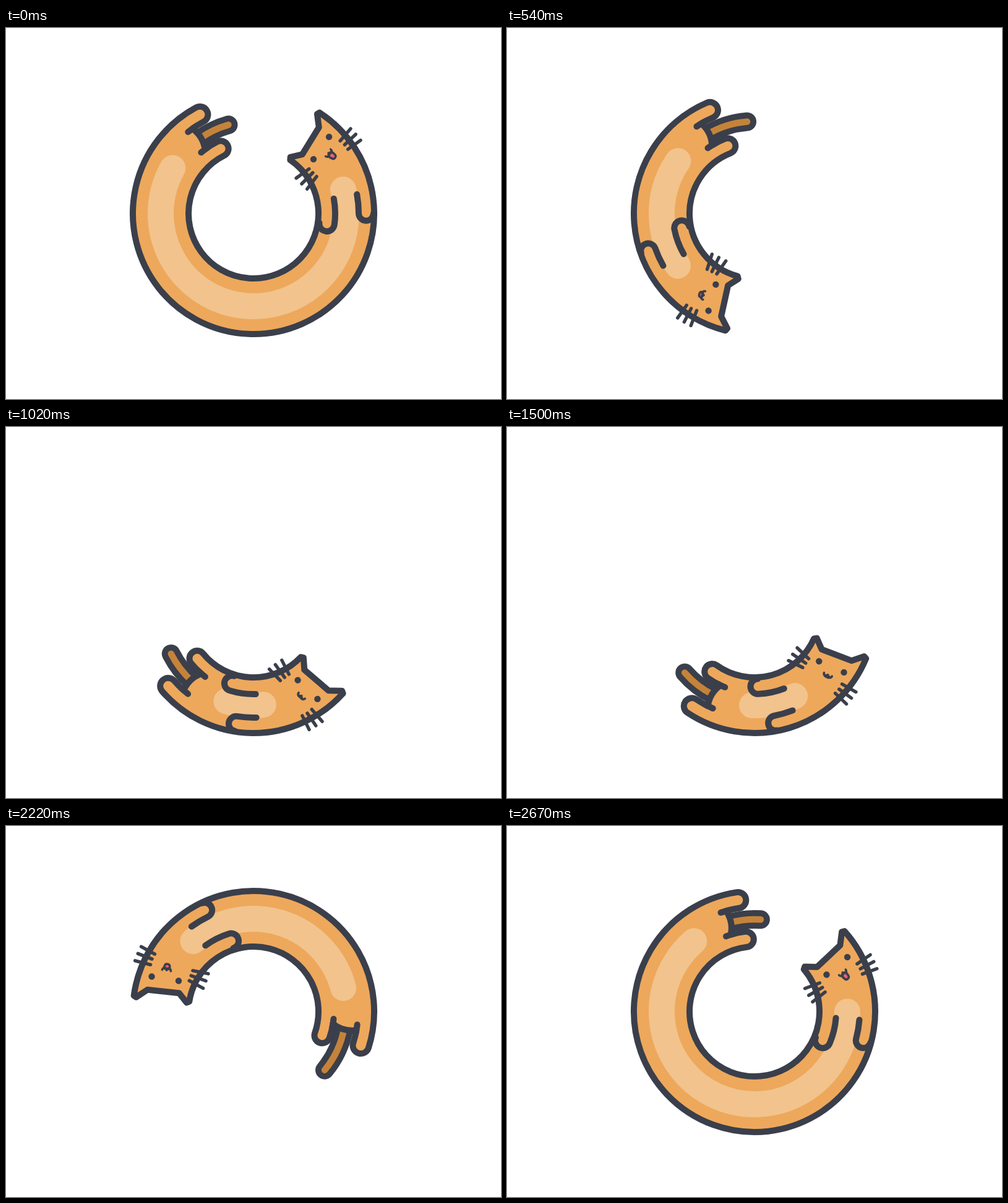
An HTML page that plays this animation: 800 by 600 pixels, repeating every 2.7 s.

```html
<!DOCTYPE html>
<html lang="en">
<head>
<meta charset="utf-8">
<title>Round cat</title>
<style>
  html, body { margin: 0; width: 100%; height: 100%; overflow: hidden; background: #fff; }
  svg { display: block; width: 100vw; height: 100vh; }
  .line { fill: none; stroke: #3a3f4b; stroke-width: 10; stroke-linecap: round; stroke-linejoin: round; }
  .thin { stroke-width: 5.4; }
  .arc { fill: none; stroke-linecap: round; }
</style>
</head>
<body>
<svg viewBox="-400 -300 800 600">
  <g id="tail">
    <path class="arc" stroke="#3a3f4b" stroke-width="30"/>
    <path class="arc" stroke="#c5833a" stroke-width="10.5"/>
  </g>
  <path id="body" class="line" style="fill:#eda85c"/>
  <path id="belly" class="arc" stroke="#f2c38c" stroke-width="42"/>
  <path id="legs" class="line"/>
  <g id="front">
    <path id="arms" class="line"/>
    <g transform="translate(152.3 0) rotate(-11.2)">
      <circle cx="-22" r="5.2" fill="#3a3f4b"/>
      <circle cx="22" r="5.2" fill="#3a3f4b"/>
      <path id="jaw" class="line" style="fill:#e8607a;stroke-width:3.6"/>
      <path class="line" style="stroke-width:3.6" d="M-7 13.5C-7 18.5 0 18.5 0 14C0 18.5 7 18.5 7 13.5"/>
      <path class="line thin" d="M-39 3L-63-5.5M-40.5 11.5L-65.5 7M-42 20L-67.5 19M27 18.5L52.7 21M26 28L50 33M23 36.5L46.5 45"/>
    </g>
  </g>
</svg>
<script>
const LOOP = 2700, STEP = 30, REST = 1165, REST_ANGLE = 52;
const SHORT = 50, STRETCH = 211, PEAK = 0.62;
const $ = id => document.getElementById(id);
const tailLines = $('tail').children;

// Polar point around the ring centre, angle in degrees
function at(r, deg) {
  const a = deg * Math.PI / 180;
  return (r * Math.cos(a)).toFixed(2) + ' ' + (r * Math.sin(a)).toFixed(2);
}

// Arc along the ring from the current point
const ring = (r, from, to) =>
  `A${r} ${r} 0 ${Math.abs(to - from) > 180 ? 1 : 0} ${to > from ? 1 : 0} ${at(r, to)}`;
const ringFrom = (r, from, to) => 'M' + at(r, from) + ring(r, from, to);

// Half circle of a paw tip
const cap = (radius, r, deg, sweep = 1) => `A${radius} ${radius} 0 0 ${sweep} ${at(r, deg)}`;

// Symmetric cubic ease, solved by bisection
function ease(u) {
  const a = 0.497;
  let lo = 0, hi = 1, s = 0.5;
  for (let i = 0; i < 30; i++) {
    const k = 1 - s;
    const x = 3 * a * s * k * k + 3 * (1 - a) * s * s * k + s * s * s;
    if (x < u) lo = s; else hi = s;
    s = (lo + hi) / 2;
  }
  return s * s * (3 - 2 * s);
}

function draw(t) {
  const p = ease(((t - REST + LOOP) % LOOP) / LOOP);
  const rising = p < PEAK;
  const stretch = rising ? Math.pow(p / PEAK, 1.07) : Math.pow((1 - p) / (1 - PEAK), 1.03);
  const head = REST_ANGLE - 720 * p;
  const rear = head + SHORT + STRETCH * stretch;

  const swing = (rising ? 9 : 6.5) * Math.sin(Math.PI * Math.pow(stretch, 0.8));
  const tip = rear + 46 - 1.8 * stretch + swing;
  const tail = ringFrom(149, rear + 25, tip);
  for (const line of tailLines) line.setAttribute('d', tail);

  $('body').setAttribute('d',
    ringFrom(195, head - 12.8, rear + 32.3) +
    cap(13, 169, rear + 32.3) + ring(169, rear + 32.3, rear + 25) +
    'Q' + at(148, rear + 27.5) + ' ' + at(130, rear + 23.5) +
    ring(130, rear + 23.5, rear + 34) + cap(12.5, 105, rear + 34) +
    ring(105, rear + 34, head - 11.6) +
    'L' + at(109, head - 12.8) + 'L' + at(124, head - 6.5) +
    'L' + at(175, head - 8.8) + 'L' + at(191, head - 13.4) + 'Z');

  $('belly').setAttribute('d', ringFrom(150, head + 29, rear));

  $('legs').setAttribute('d',
    ringFrom(169, rear + 21.9, rear + 27) + ringFrom(130, rear + 20, rear + 26));

  $('front').setAttribute('transform', `rotate(${head.toFixed(3)})`);

  const open = Math.min(1, 1.1 * Math.pow(stretch, 0.6));
  const y = (16.8 + 10.5 * open).toFixed(2);
  $('jaw').setAttribute('d', `M-4.5 16.8C-4.5 ${y} -2.5 ${y} 0 ${y}C2.5 ${y} 4.5 ${y} 4.5 16.8L0 15Z`);
}

$('arms').setAttribute('d',
  ringFrom(132, 33.5, 52) + cap(12.2, 107.5, 52) +
  ringFrom(170, 33.5, 44) + cap(12, 194, 44, 0));

const start = performance.now();
function frame() {
  const t = (performance.now() - start + 1) % LOOP;
  draw(Math.floor(t / STEP) * STEP);
  requestAnimationFrame(frame);
}
frame();
</script>
</body>
</html>
```
